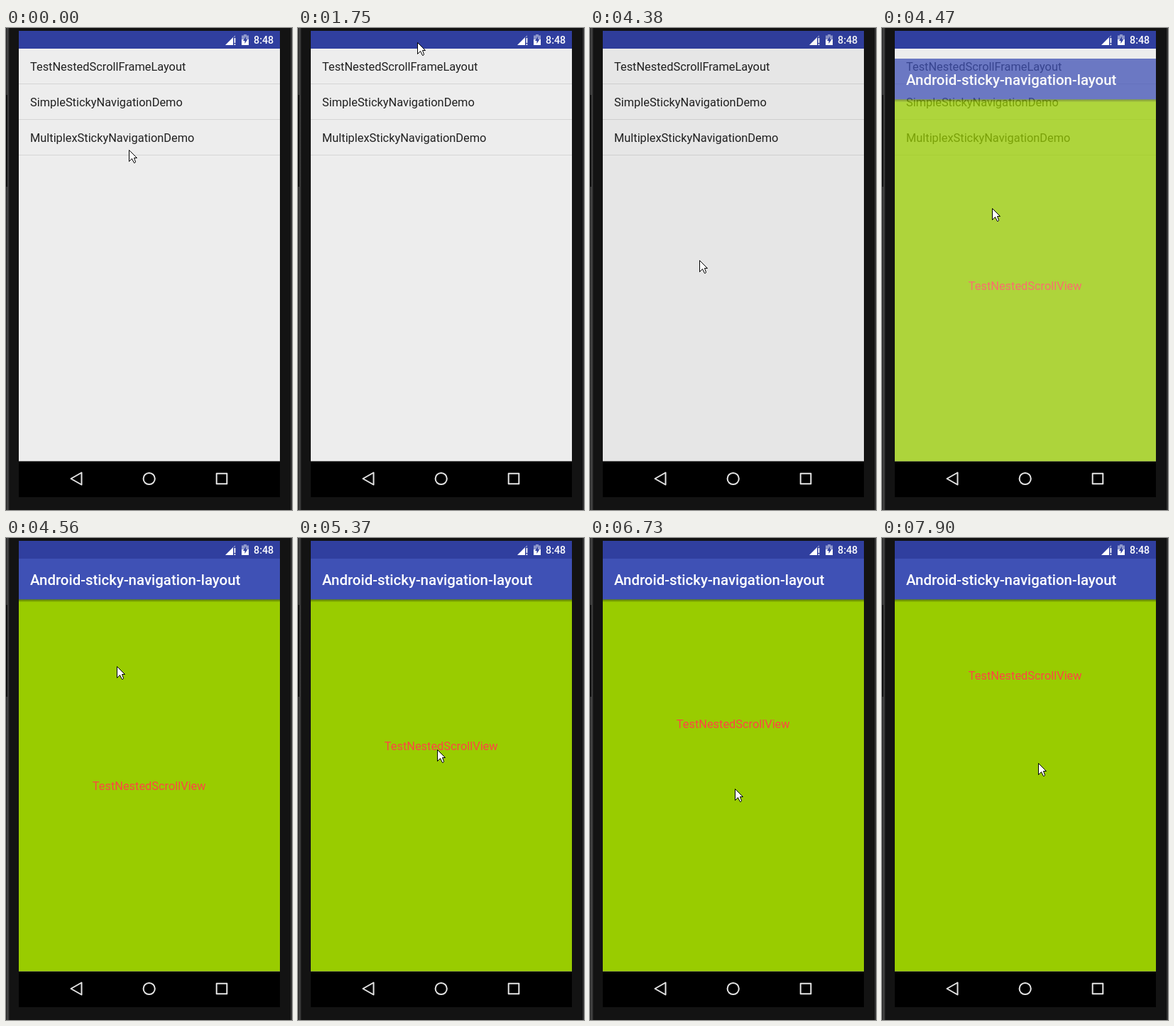
These frames come from a looping animation (403 px wide and 677 px high, 7.99 s). An HTML page:

```html
<!DOCTYPE html>
<html lang="en">
<head>
<meta charset="utf-8">
<title>Sticky navigation demo</title>
<style>
  html, body { margin: 0; width: 100%; height: 100%; overflow: hidden; background: #131313; }
  svg { display: block; font: 16.36px Roboto, sans-serif; }
  .medium { font-weight: 500; fill: #fff; }
  .list { fill: #212121; }
</style>
</head>
<body>
<svg width="403" height="677" viewBox="0 0 403 677">
  <defs>
    <linearGradient id="edge">
      <stop offset="0" stop-color="#222"/>
      <stop offset=".5" stop-color="#484848"/>
      <stop offset="1" stop-color="#131313"/>
    </linearGradient>
    <linearGradient id="shade" x2="0" y2="1">
      <stop offset="0" stop-opacity=".4"/>
      <stop offset="1" stop-opacity="0"/>
    </linearGradient>
    <clipPath id="screen"><rect x="18" y="4" width="368" height="604.5"/></clipPath>
  </defs>

  <!-- phone body -->
  <rect width="403" height="677" fill="#131313"/>
  <rect width="5" height="677" fill="url(#edge)"/>
  <rect y="94" width="2" height="129" fill="#0c0c0c"/>
  <rect x="401" width="2" height="677" fill="#333"/>
  <rect x="18" y="608" width="368" height="51"/>
  <g fill="none" stroke="#e4e4e4" stroke-width="2" stroke-linejoin="round">
    <path d="M91.5 633L106.5 624.5V641.5Z"/>
    <circle cx="201.7" cy="633" r="8.1"/>
    <rect x="296.7" y="625.7" width="14.6" height="14.6"/>
  </g>

  <g clip-path="url(#screen)">
    <rect x="18" y="29" width="368" height="580" fill="#ededed"/>
    <g id="list" class="list"></g>
    <g id="page">
      <rect x="18" y="86" width="368" height="560" fill="#9c0"/>
      <text id="label" x="201.7" text-anchor="middle" fill="#f44">TestNestedScrollView</text>
      <rect x="18" y="29" width="368" height="57.4" fill="#3f51b5"/>
      <rect x="18" y="86.4" width="368" height="4" fill="url(#shade)"/>
      <text class="medium" x="34" y="65.8" font-size="20.44">Android-sticky-navigation-layout</text>
    </g>
    <rect x="18" y="4" width="368" height="25" fill="#303f9f"/>
    <g fill="#fff">
      <path d="M309 24L320 13V24Z"/>
      <path opacity=".4" d="M320 13L323 10V13Z"/>
      <path d="M321.5 14H323.3V21H321.5ZM321.5 22.3H323.3V24H321.5Z"/>
      <path opacity=".45" d="M335 9H339V10.5H342V16H332V10.5H335Z"/>
      <path d="M332 16H342V24H332Z"/>
      <path fill="#303f9f" d="M338 12L334 18H336.5V22L340.3 16H338Z"/>
    </g>
    <text class="medium" x="349" y="22" font-size="14.3">8:48</text>
    <rect id="dim" x="18" y="4" width="368" height="605"/>
  </g>

  <path id="cursor" fill="#fff" stroke="#000" d="M.5 .5V16.5L4.5 12.5L7.5 18.5H8.5L9.5 17L7.5 11.5H11.5Z"/>
</svg>

<script>
const LOOP = 7990, STEP = 90, OPEN = 4380;

const $ = id => document.getElementById(id);
const stepAt = (t, start) => Math.floor((t - start + 10) / STEP) + 1;
const lerp = (a, b, u) => a + (b - a) * u;

// Cursor strokes; bow bends the path sideways, label is where a drag leaves the text
const moves = [
  { at: 410, steps: 4, x: 155, y: 163 },
  { at: 850, steps: 5, x: 168, y: 40, bow: 40 },
  { at: 1570, steps: 3, x: 168, y: 20 },
  { at: 1840, steps: 4, x: 172, y: 45 },
  { at: 2580, steps: 9, x: 184, y: 188 },
  { at: 3390, steps: 7, x: 154, y: 326, bow: 30 },
  { at: 4470, steps: 2, x: 156, y: 180 },
  { at: 4650, steps: 6, x: 196, y: 372 },
  { at: 5190, steps: 9, x: 197, y: 146, label: 180 },
  { at: 6000, steps: 3, x: 199, y: 90, label: 124 },
  { at: 6550, steps: 3, x: 204, y: 352, label: 261 },
  { at: 6820, steps: 2, x: 206, y: 420, label: 329 },
  { at: 7090, steps: 5, x: 212, y: 100, label: 9 },
  { at: 7720, steps: 3, x: 220, y: 316, label: 193 }
];

function poseAt(t) {
  let pose = { x: 173, y: 171, label: 348 };
  for (const { at, steps, x, y, bow = 0, label = pose.label } of moves) {
    if (t < at) break;
    const u = Math.min(1, stepAt(t, at) / steps);
    pose = {
      x: lerp(pose.x, x, u) + bow * Math.sin(Math.PI * u),
      y: lerp(pose.y, y, u),
      label: lerp(pose.label, label, u)
    };
  }
  return pose;
}

function draw(t) {
  const { x, y, label } = poseAt(t);
  const opening = t < OPEN ? 0 : stepAt(t, OPEN);
  $("cursor").setAttribute("transform", `translate(${Math.round(x)} ${Math.round(y)})`);
  $("label").setAttribute("y", label + 6);
  $("dim").setAttribute("opacity", opening === 1 ? .03 : 0);
  $("page").setAttribute("opacity", opening < 2 ? 0 : opening === 2 ? .75 : 1);
  $("page").setAttribute("transform", `translate(0 ${opening === 2 ? 14 : 0})`);
}

function tick() {
  draw(performance.now() % LOOP);
  requestAnimationFrame(tick);
}

const demos = ["TestNestedScrollFrameLayout", "SimpleStickyNavigationDemo", "MultiplexStickyNavigationDemo"];
$("list").innerHTML = demos.map((name, i) => `
  <text x="34" y="${60 + 50 * i}">${name}</text>
  <rect x="18" y="${78 + 50 * i}" width="368" height="1" fill="#d5d5d5"/>`).join("");
tick();
</script>
</body>
</html>
```
